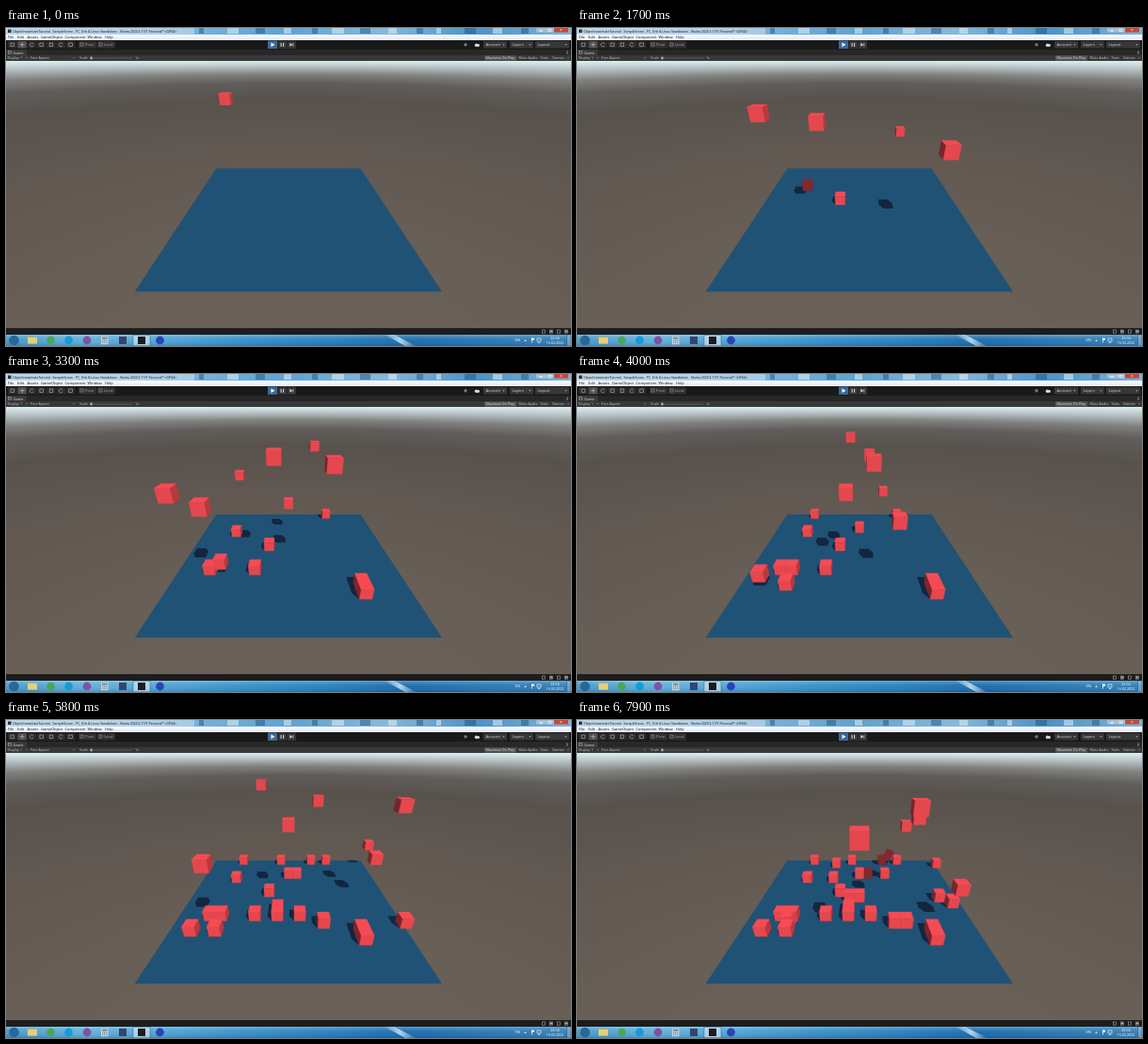
These frames come from a looping animation (600x338 px, 8000 ms). An HTML page with a canvas:

```html
<!DOCTYPE html>
<html lang="en">
<head>
<meta charset="utf-8">
<title>Falling cubes</title>
<style>
html, body { margin: 0; width: 100%; height: 100%; overflow: hidden; background: #282828; }
canvas { display: block; width: 600px; height: 338px; }
</style>
</head>
<body>
<canvas id="stage" width="600" height="338"></canvas>
<script>
const W = 600, H = 338, LOOP = 8000, STEP = 100;
const VIEW = { top: 35, bottom: 319, cx: 300, cy: 176.7, f: 246 };
const CAM = { y: 6.5, z: -9.9, sin: 0.5, cos: Math.sqrt(3) / 2 };
const SUN = [0.321, 0.766, -0.557];
const SPAWN_H = 5, HALF_G = 2.4, R = 0.25;
const ctx = document.getElementById('stage').getContext('2d');

// x, z, spawn time in seconds
const DROPS = [
  [-3, 2, -.19], [-1, .5, .25], [2.5, 4.5, .72], [3, -2.5, 1.03], [-1.5, -1.5, 1.3], [-3.5, -1.5, 1.51],
  [3, -3, 1.75], [-3, -1.5, 1.94], [0, 2.5, 2.14], [-3, 4.5, 2.35], [-3, -2.5, 2.52], [-4, -2.5, 2.66],
  [1.5, 4.5, 2.85], [1.5, -2, 3.04], [-.5, -1.5, 3.27], [.5, 2.5, 3.49], [.5, -1.5, 3.71], [-.5, 4.5, 3.92],
  [-.5, -1, 4.13], [5, -2, 4.34], [5, 4, 4.59], [4, 0, 4.74], [-3, -2.5, 4.92], [0, 0, 5.1],
  [1.5, 2.5, 5.29], [4.5, -.5, 5.46], [-1.5, 4, 5.66], [-1.5, 2, 5.87], [2, -2, 6.05], [-.5, 0, 6.26],
  [2, 4.5, 6.55], [4, -2, 6.76], [2.5, 2.5, 7.01], [2.5, 0, 7.3], [0, -4, 7.47], [2, -2, 7.74]
];
const TOPPLING = 19, STACKED = 22, WEDGED = 30, NUDGED = 12;

const clamp = (v, a = 0, b = 1) => Math.max(a, Math.min(b, v));
const mix = (a, b, k) => a + (b - a) * k;
const rgb = c => `rgb(${c.map(Math.round).join(',')})`;

function project([x, y, z]) {
  const py = y - CAM.y, pz = z - CAM.z;
  const d = CAM.cos * pz - CAM.sin * py;
  return [VIEW.cx + VIEW.f * x / d, VIEW.cy - VIEW.f * (CAM.cos * py + CAM.sin * pz) / d];
}

function path(c, pts) {
  c.beginPath();
  pts.forEach(p => c.lineTo(p[0], p[1]));
  c.closePath();
}

// ---------- cubes ----------
function pose(i, t) {
  const [x, z, born] = DROPS[i];
  const age = t - born;
  if (age < 0) return null;
  const free = SPAWN_H - HALF_G * age * age;
  const c = { x, z, y: Math.max(R, free), roll: 0, yaw: 0 };
  if (i === TOPPLING && t > 5.8) {
    const u = t - 5.8, a = 0.7 * u * u;
    const drop = Math.max(0, t - 6.85);
    c.roll = -a;
    c.x = x + R * Math.sin(Math.min(a, 1.6));
    c.y = R * Math.cos(Math.min(a, 1.6)) - HALF_G * drop * drop;
  }
  if (i === STACKED) {
    const slide = clamp((t - 6.25) / 0.55), settle = clamp((t - 6.8) / 0.8);
    c.y = Math.max(mix(0.75, 0.42, settle), free);
    c.z = z + 0.5 * slide - 0.1 * settle;
    c.roll = 0.6 * slide * (1 - 0.8 * settle);
    c.yaw = 0.5 * slide * (1 - 0.8 * settle);
  }
  if (i === WEDGED) {
    const k = clamp((t - 7.7) / 0.2);
    c.y = Math.max(0.6, free);
    c.x -= 0.08 * k;
    c.roll = -0.35 * k;
    c.yaw = 0.3 * k;
  }
  if (i === NUDGED) c.roll = 0.15 * clamp((t - 7.7) / 0.2);
  return c;
}

function turn([x, y, z], { roll, yaw }) {
  const a = x * Math.cos(roll) - y * Math.sin(roll);
  const b = x * Math.sin(roll) + y * Math.cos(roll);
  return [a * Math.cos(yaw) + z * Math.sin(yaw), b, z * Math.cos(yaw) - a * Math.sin(yaw)];
}

const place = (v, c) => {
  const r = turn(v, c);
  return [c.x + r[0] * R, c.y + r[1] * R, c.z + r[2] * R];
};

const SIGNS = [-1, 1];
const CORNERS = SIGNS.flatMap(x => SIGNS.flatMap(y => SIGNS.map(z => [x, y, z])));
const RING = [[-1, -1], [1, -1], [1, 1], [-1, 1]];
const FACES = [0, 1, 2].flatMap(axis => SIGNS.map(s => {
  const n = [0, 0, 0];
  n[axis] = s;
  const pts = RING.map(([a, b]) => {
    const v = [...n];
    v[(axis + 1) % 3] = a;
    v[(axis + 2) % 3] = b;
    return v;
  });
  return { n, pts };
}));

function hull(pts) {
  const p = [...pts].sort((a, b) => a[0] - b[0] || a[1] - b[1]);
  const half = list => {
    const out = [];
    for (const q of list) {
      while (out.length > 1) {
        const a = out[out.length - 2], b = out[out.length - 1];
        if ((b[0] - a[0]) * (q[1] - a[1]) - (b[1] - a[1]) * (q[0] - a[0]) > 0) break;
        out.pop();
      }
      out.push(q);
    }
    out.pop();
    return out;
  };
  return half(p).concat(half(p.reverse()));
}

function drawShadow(c) {
  const pts = CORNERS.map(v => {
    const [x, y, z] = place(v, c), k = y / SUN[1];
    return project([x - SUN[0] * k, 0, z - SUN[2] * k]);
  });
  path(ctx, hull(pts));
  ctx.fill();
}

function isShaded(c, all) {
  return all.some(o => {
    const k = (o.y - c.y) / SUN[1];
    return k > 1 && Math.abs(o.x - SUN[0] * k - c.x) < 0.5 && Math.abs(o.z - SUN[2] * k - c.z) < 0.5;
  });
}

function drawCube(c, shaded) {
  for (const { n, pts } of FACES) {
    const m = turn(n, c), q = place(n, c);
    if (m[0] * -q[0] + m[1] * (CAM.y - q[1]) + m[2] * (CAM.z - q[2]) <= 0) continue;
    const lit = shaded ? 0.06 : Math.max(0, m[0] * SUN[0] + m[1] * SUN[1] + m[2] * SUN[2]);
    const r = Math.min(246, 118 + 200 * lit);
    ctx.fillStyle = ctx.strokeStyle = rgb([r, r * 0.29 + 4, r * 0.32 + 5]);
    ctx.lineWidth = 0.3;
    path(ctx, pts.map(v => project(place(v, c))));
    ctx.fill();
    ctx.stroke();
  }
}

// ---------- backdrop ----------
const SKY = [
  [0, 222, 240, 243], [.018, 186, 198, 200], [.045, 128, 129, 127], [.075, 96, 93, 90],
  [.13, 88, 82, 77], [.3, 96, 88, 81], [.6, 104, 95, 87], [1, 106, 97, 89]
];

function skyColor(e) {
  const i = Math.max(1, SKY.findIndex(s => s[0] >= e));
  const a = SKY[i - 1], b = SKY[i], k = clamp((e - a[0]) / (b[0] - a[0]));
  return [1, 2, 3].map(j => mix(a[j], b[j], k));
}

function layer() {
  const c = document.createElement('canvas');
  c.width = W;
  c.height = H;
  return c;
}

function makeSky() {
  const c = layer(), g = c.getContext('2d');
  const img = g.createImageData(W, VIEW.bottom - VIEW.top);
  for (let y = 0, i = 0; y < img.height; y++) {
    for (let x = 0; x < W; x++, i += 4) {
      const u = (x + 0.5 - VIEW.cx) / VIEW.f, v = (VIEW.cy - y - VIEW.top - 0.5) / VIEW.f;
      const e = (CAM.sin - CAM.cos * v) / Math.hypot(u, v, 1);
      img.data.set([...skyColor(clamp(e)), 255], i);
    }
  }
  g.putImageData(img, 0, VIEW.top);
  return c;
}

function makeChrome() {
  const c = layer(), g = c.getContext('2d');
  const rect = (x, y, w, h, col) => { g.fillStyle = col; g.fillRect(x, y, w, h); };
  const dot = (x, y, r, col) => { g.fillStyle = col; g.beginPath(); g.arc(x, y, r, 0, 7); g.fill(); };
  const box = (x, y, w, h, col) => { g.strokeStyle = col; g.lineWidth = 0.6; g.strokeRect(x, y, w, h); };
  const text = (s, x, y, size, col, align = 'left') => {
    g.font = `${size}px "Open Sans", sans-serif`;
    g.fillStyle = col;
    g.textAlign = align;
    g.fillText(s, x, y);
  };
  const fade = (x0, y0, x1, y1, ...cols) => {
    const f = g.createLinearGradient(x0, y0, x1, y1);
    cols.forEach((col, i) => f.addColorStop(i / (cols.length - 1), col));
    return f;
  };
  const tri = (x, y, s, col) => { g.fillStyle = col; path(g, [[x - s, y - s / 2], [x + s, y - s / 2], [x, y + s / 2]]); g.fill(); };

  // title bar
  rect(0, 0, W, 7, fade(0, 0, W, 0, '#a9cbe4', '#a6cae4', '#78b2da', '#5fa3d0', '#86b9db', '#4b93c6', '#7fb4d8'));
  for (let i = 0; i < 13; i++) rect(205 + i * 28 + (i * 11) % 9, 0, 5 + (i * 7) % 9, 6, i % 2 ? 'rgba(225,240,250,.55)' : 'rgba(25,75,125,.45)');
  rect(0, 0, 200, 7, 'rgba(210,228,240,.5)');
  rect(2, 1.5, 3.5, 3.5, '#333');
  text('ObjectInstantiateTutorial - SampleScene - PC, Orb & Linux Standalone - Nodra 2020.3.11f1 Personal* <GPU4>', 7, 4.8, 3.45, '#111');
  rect(563, 0, 10, 4.5, '#9fc0d8');
  rect(573, 0, 9, 4.5, '#9fc0d8');
  rect(582, 0, 15, 4.5, '#c4493a');
  rect(566, 2.5, 4, 1, '#fff');
  box(576, 1.2, 3, 2.2, '#fff');
  text('×', 589.5, 4, 5, '#fff', 'center');

  // menu
  rect(0, 7, W, 6, fade(0, 7, 0, 13, '#fbfcfe', '#e2e8f3'));
  [['File', 2], ['Edit', 12], ['Assets', 22.5], ['GameObject', 37], ['Component', 62.5], ['Window', 86.5], ['Help', 105]]
    .forEach(([s, x]) => text(s, x, 11.3, 4, '#111'));

  // toolbar
  rect(0, 13, W, 10, '#191919');
  for (let i = 0; i < 7; i++) {
    const x = 2 + i * 10.3;
    rect(x, 14, 9.6, 7.5, i === 1 ? '#505050' : '#2c2c2c');
    const m = x + 4.8, col = '#b8b8b8';
    if (i === 1) { rect(m - 2.5, 17.4, 5, .7, col); rect(m - .3, 15.2, .7, 5, col); }
    else if (i % 3 === 2) { g.strokeStyle = col; g.lineWidth = .6; g.beginPath(); g.arc(m, 17.8, 2, .5, 6); g.stroke(); }
    else box(m - 1.8, 16, 3.6, 3.4, col);
  }
  [['Pivot', 77], ['Local', 97]].forEach(([s, x]) => {
    rect(x, 14, 19, 7.5, '#303030');
    box(x + 2, 16, 3, 3, '#999');
    text(s, x + 7, 19.2, 4, '#aaa');
  });
  rect(278, 13.5, 10, 8.5, '#3d6a98');
  rect(288.5, 13.5, 9.5, 8.5, '#333');
  rect(298.5, 13.5, 9.5, 8.5, '#333');
  g.fillStyle = '#fff';
  path(g, [[281.5, 15.5], [285.5, 17.8], [281.5, 20]]);
  g.fill();
  rect(291.5, 15.8, 1.2, 4, '#ccc');
  rect(294, 15.8, 1.2, 4, '#ccc');
  g.fillStyle = '#ccc';
  path(g, [[301.3, 15.8], [304.3, 17.8], [301.3, 19.8]]);
  g.fill();
  rect(304.5, 15.8, .8, 4, '#ccc');
  dot(488, 17.8, 1.7, '#777');
  dot(499.5, 18.3, 1.7, '#ddd');
  dot(501.5, 18.5, 1.4, '#ddd');
  [['Account', 507, 25], ['Layers', 535, 25], ['Layout', 562, 36]].forEach(([s, x, w]) => {
    rect(x, 14, w, 7.5, '#373737');
    text(s, x + 2.5, 19.4, 4.1, '#ddd');
    tri(x + w - 3.5, 17.8, 1.3, '#bbb');
  });

  // game tab and its options
  rect(0, 23, W, 6, '#282828');
  rect(0, 23, 22, 6, '#3a3a3a');
  box(2.5, 24.7, 3, 2.4, '#bbb');
  text('Game', 7.5, 27.6, 4, '#ddd');
  rect(595.5, 24.4, 1, 3.4, '#999');
  rect(0, 29, W, 6, '#383838');
  text('Display 1', 1.5, 33.3, 3.7, '#c4c4c4');
  tri(22, 32, 1, '#aaa');
  text('Free Aspect', 26, 33.3, 3.7, '#c4c4c4');
  tri(72, 32, 1, '#aaa');
  text('Scale', 78, 33.3, 3.7, '#c4c4c4');
  rect(90, 31.7, 44, .7, '#686868');
  dot(90.5, 32, 1.4, '#aaa');
  text('1x', 137, 33.3, 3.7, '#bbb');
  rect(508, 29.3, 34, 5.4, '#555');
  text('Maximize On Play', 509.5, 33.3, 3.7, '#ddd');
  text('Mute Audio', 544.5, 33.3, 3.7, '#c4c4c4');
  text('Stats', 567.5, 33.3, 3.7, '#c4c4c4');
  text('Gizmos', 580, 33.3, 3.7, '#c4c4c4');
  tri(597, 32, 1, '#aaa');

  // status bar
  rect(0, 319, W, 7, '#1d1d1d');
  [571, 579, 587, 595].forEach((x, i) => {
    box(x - 1.6, 321, 3.2, 3.2, '#aaa');
    if (i % 2) dot(x, 322.6, 1, '#ccc');
  });

  // taskbar
  rect(0, 326, W, 12, fade(0, 0, W, 0, '#4d9bc9', '#67b3db', '#52a5d4', '#3a90c8', '#2b80bd', '#1d6bab', '#2d78b3', '#387fb5'));
  rect(0, 326, W, 12, fade(0, 326, 0, 338, 'rgba(225,245,255,.35)', 'rgba(90,170,215,.05)', 'rgba(5,45,95,.25)'));
  g.fillStyle = fade(400, 0, 436, 0, 'rgba(255,255,255,0)', 'rgba(225,246,255,.75)', 'rgba(255,255,255,0)');
  path(g, [[402, 326], [412, 326], [436, 338], [424, 338]]);
  g.fill();
  rect(135, 326.5, 18, 11.5, 'rgba(225,240,250,.6)');
  box(135, 326.5, 18, 11.2, 'rgba(20,60,95,.6)');
  dot(8.5, 332, 5.3, '#286797');
  rect(23, 328.8, 10, 6.8, '#e8cf79');
  rect(23, 328, 4, 1.2, '#d1ae4f');
  dot(47.5, 332, 4.3, '#4aa655');
  dot(66.5, 332, 4.4, '#159bd7');
  dot(86, 332, 4.4, '#7b55a3');
  rect(101, 327.8, 7.5, 8.4, '#c6d6e2');
  rect(102, 328.7, 5.5, 2, '#668d9c');
  for (let i = 0; i < 6; i++) rect(102 + i % 3 * 2, 331.7 + Math.floor(i / 3) * 2, 1.3, 1.2, i === 5 ? '#d5783f' : '#72889b');
  rect(120, 328, 8, 8, '#34466e');
  rect(140, 328, 8, 8, '#1c1c1c');
  dot(163.5, 332, 4.4, '#2b43b8');
  text('EN', 540.5, 333.3, 4, '#fff');
  tri(551.5, 332, -1.4, '#fff');
  rect(558, 329.5, .7, 5, '#fff');
  rect(558, 329.7, 3, 2, '#fff');
  box(564, 330, 4, 3, '#fff');
  rect(565, 334, 2, .7, '#fff');
  text('23:56', 583, 330.9, 3.8, '#fff', 'center');
  text('16.02.2022', 583, 336.3, 3.7, '#fff', 'center');
  rect(595.5, 326, 4.5, 12, 'rgba(180,215,235,.4)');
  box(595.5, 326, 4.5, 12, 'rgba(15,50,85,.6)');
  return c;
}

// ---------- playback ----------
const sky = makeSky(), chrome = makeChrome();
const FLOOR = [[223.3, 149.3], [376.5, 149.3], [463, 280.3], [136.7, 280.3]];
const dist = c => Math.hypot(c.x, c.y - CAM.y, c.z - CAM.z);

function draw(t) {
  const cubes = DROPS.map((_, i) => pose(i, t)).filter(Boolean).sort((a, b) => dist(b) - dist(a));
  ctx.drawImage(sky, 0, 0);
  cubes.filter(c => c.y < 0).forEach(c => drawCube(c, false));
  const above = cubes.filter(c => c.y >= 0);

  ctx.save();
  path(ctx, FLOOR);
  ctx.fillStyle = '#205276';
  ctx.fill();
  ctx.clip();
  ctx.fillStyle = '#14253f';
  above.forEach(drawShadow);
  ctx.restore();

  above.forEach(c => drawCube(c, isShaded(c, above)));
  ctx.drawImage(chrome, 0, 0);
}

const start = performance.now();
function tick(now) {
  const ms = Math.max(0, now - start) % LOOP;
  draw(Math.floor(ms / STEP) * STEP / 1000);
  requestAnimationFrame(tick);
}
draw(0);
requestAnimationFrame(tick);
</script>
</body>
</html>
```
